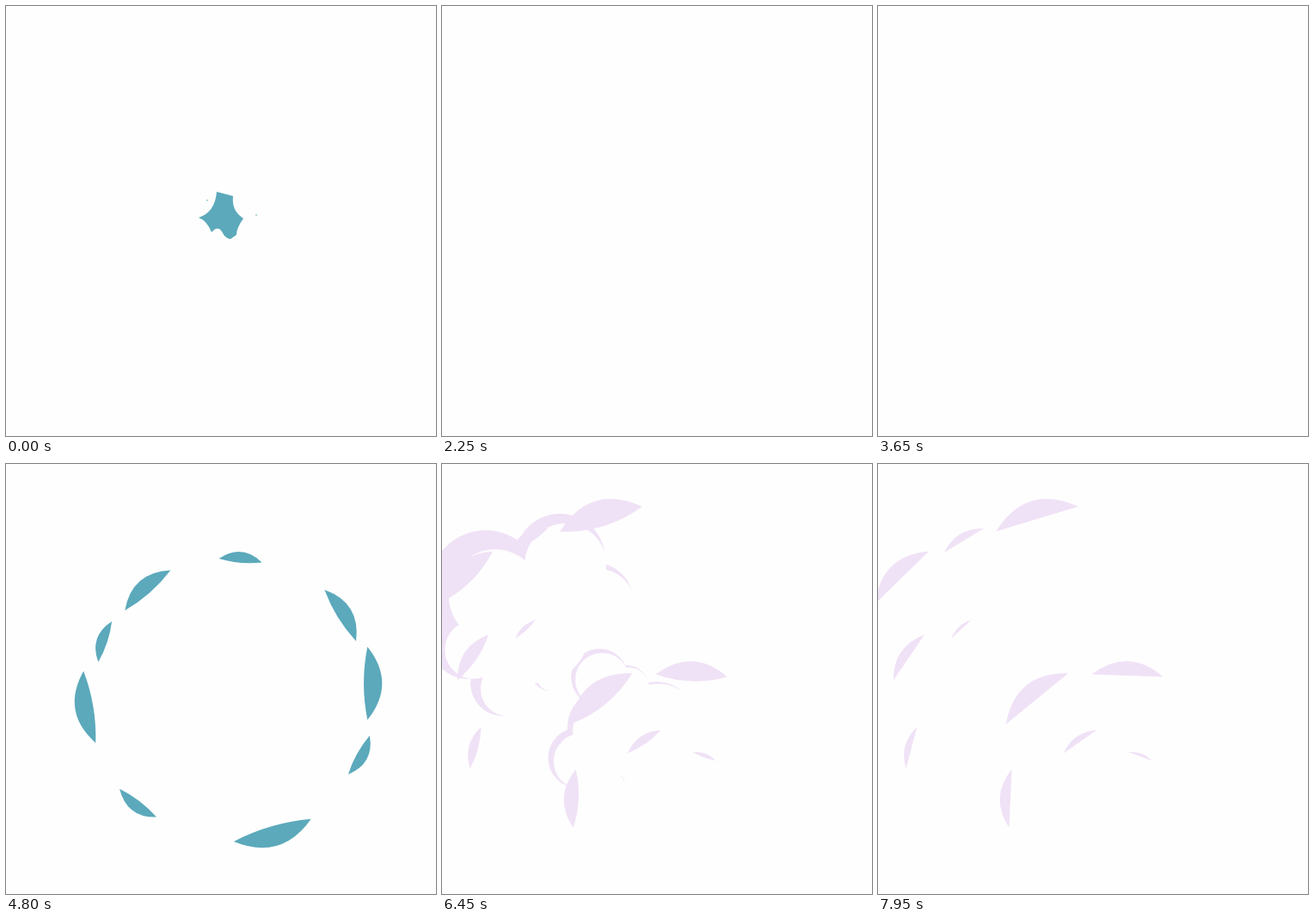
An HTML page with a canvas for the animation above (8000 ms loop, 500 by 500 pixels).

```html
<!DOCTYPE html>
<html lang="en">
<head>
<meta charset="utf-8">
<title>Puffs</title>
<style>
html, body { margin: 0; width: 100%; height: 100%; overflow: hidden; background: #fefefe; }
canvas { display: block; width: 100vw; height: 100vh; }
</style>
</head>
<body>
<canvas id="stage" width="500" height="500"></canvas>
<script>
const ctx = document.getElementById('stage').getContext('2d');
const WHITE = '#fefefe', TEAL = '#5ba9bb', LILAC = '#f0e2f6', PURPLE = '#c98be0';
const LOOP = 8000, CYCLE = 1400, SMOKE_START = 5600, HOLD = 250, TICK = 50;
const BURST_END = 600, WISPS_FROM = 550, WISPS_FULL = 700, SMOKE_END = 950;

// Cloud lobes: x, y, radius
const LOBES = [
  [108, 191, 61], [189, 161, 49], [226, 208, 43], [88, 253, 39], [127, 297, 35.5],
  [178, 285, 20], [155, 230, 65], [232, 290, 31], [262, 300, 23], [294, 337, 42],
  [366, 333, 50], [385, 360, 32], [446, 386, 24], [404, 390, 24], [430, 394, 20],
  [360, 386, 25], [293, 375, 44], [209, 378, 33], [228, 381, 30], [240, 345, 43],
  [335, 358, 40]
];
// Shadows in the notches: x, y, length, degrees, bulge
const SHADES = [
  [228, 174, 28, -39, 5], [227, 265, 51, -13, 20], [194, 318, 38, 78, 13],
  [79, 287, 46, 15, -11], [338, 381, 22, 0, -16], [437, 420, 38, 15, 7]
];
// Remaining rims of the smoke, all turned away from FOCUS: x, y, length
const FOCUS = [285, 395];
const WISPS = [
  [185, 64, 100], [100, 89, 54], [28, 132, 87], [36, 225, 64], [97, 192, 32], [39, 330, 50],
  [185, 273, 94], [290, 246, 83], [154, 389, 68], [235, 323, 47], [305, 340, 29]
];
const TAIL = new Path2D('M468 393 Q460 413 470 425 Q476 436 486 440 Q472 442 455 424 L432 402 Z');
const STAR = new Path2D('M245 216 L264 221 Q262 238 276 247 Q268 258 268 266 L261 271 ' +
  'Q255 270 252 264 Q247 254 239 263 Q234 250 224 246 Q243 240 245 216 Z');

const easeOut = p => 1 - (1 - p) ** 2;

function disc(x, y, r) {
  ctx.beginPath();
  ctx.arc(x, y, r, 0, 7);
  ctx.fill();
}

// Sliver between two arcs over one chord
function crescent(x, y, length, angle, outer, inner) {
  ctx.save();
  ctx.translate(x, y);
  ctx.rotate(angle);
  ctx.beginPath();
  ctx.moveTo(-length / 2, 0);
  ctx.quadraticCurveTo(0, -2 * outer, length / 2, 0);
  ctx.quadraticCurveTo(0, -2 * inner, -length / 2, 0);
  ctx.fill();
  ctx.restore();
}

function zoom(x, y, s) {
  ctx.translate(x, y);
  ctx.scale(s, s);
  ctx.translate(-x, -y);
}

function drawStar(s) {
  ctx.save();
  zoom(252, 246, 1 + 0.9 * (s / TICK + 1));
  ctx.fill(STAR);
  disc(234, 226, 0.8);
  disc(291, 243, 0.8);
  ctx.fillStyle = WHITE;
  if (s >= 0) disc(252, 246, 3 + s / 6);
  ctx.restore();
}

function drawBurst(s) {
  if (s >= BURST_END) return;
  ctx.fillStyle = TEAL;
  if (s < 100) return drawStar(s);
  const p = s / BURST_END, reach = 50 + 155 * easeOut(p);
  for (let k = 0; k < 9; k++) {
    const a = k * 0.698 + 0.2 * Math.sin(k * 5);
    const r = reach * (0.9 + 0.1 * Math.sin(k * 7));
    const length = r * (0.5 + 0.14 * Math.cos(k * 3)) * (1 - p * p / 2);
    const bulge = length * 0.2;
    crescent(260 + r * Math.cos(a), 255 + r * Math.sin(a), length, a + Math.PI / 2,
      bulge, bulge * (3 * p - 2));
  }
}

function drawCloud(s) {
  const drift = easeOut(Math.max(0, s - 150) / 550);
  const gone = Math.max(0, s - 250) / 450;
  ctx.save();
  ctx.translate(-50 * drift, -45 * drift);
  zoom(486, 440, Math.min(1, 0.5 + s / 200));
  zoom(240, 270, 1 + 0.07 * drift);
  ctx.fillStyle = LILAC;
  for (const lobe of LOBES) disc(...lobe);
  if (!gone) {
    ctx.fill(TAIL);
    ctx.fillStyle = PURPLE;
    for (const [x, y, length, deg, bulge] of SHADES)
      crescent(x, y, length, deg * Math.PI / 180, bulge, bulge * 0.4);
  }
  // Holes open from the lower right of every lobe
  ctx.fillStyle = WHITE;
  if (gone) for (const [x, y, r] of LOBES) {
    const g = Math.min(1, gone * (0.85 + x / 900)), shift = 0.7 * r * (1 - g);
    disc(x + shift, y + shift, r * 1.1 * g);
  }
  ctx.restore();
}

function drawWisps(s) {
  const weight = (SMOKE_END - s) / (SMOKE_END - WISPS_FULL);
  const rise = Math.max(0, s - WISPS_FULL) * 0.06;
  ctx.fillStyle = LILAC;
  for (const [x, y, length] of WISPS) {
    const angle = Math.atan2(y - FOCUS[1], x - FOCUS[0]) + Math.PI / 2;
    const bulge = 0.022 * length ** 1.5;
    crescent(x, y - rise, length, angle, bulge, bulge * (1 - weight));
  }
}

function drawSmoke(s) {
  if (s < WISPS_FULL) drawCloud(s);
  if (s >= WISPS_FROM && s < SMOKE_END) drawWisps(s);
}

function frame(now) {
  const t = now % LOOP;
  ctx.fillStyle = WHITE;
  ctx.fillRect(0, 0, 500, 500);
  const s = Math.max(-TICK, Math.floor((t % CYCLE - HOLD) / TICK) * TICK);
  if (t < SMOKE_START) drawBurst(s);
  else drawSmoke(s);
  requestAnimationFrame(frame);
}
requestAnimationFrame(frame);
</script>
</body>
</html>
```
